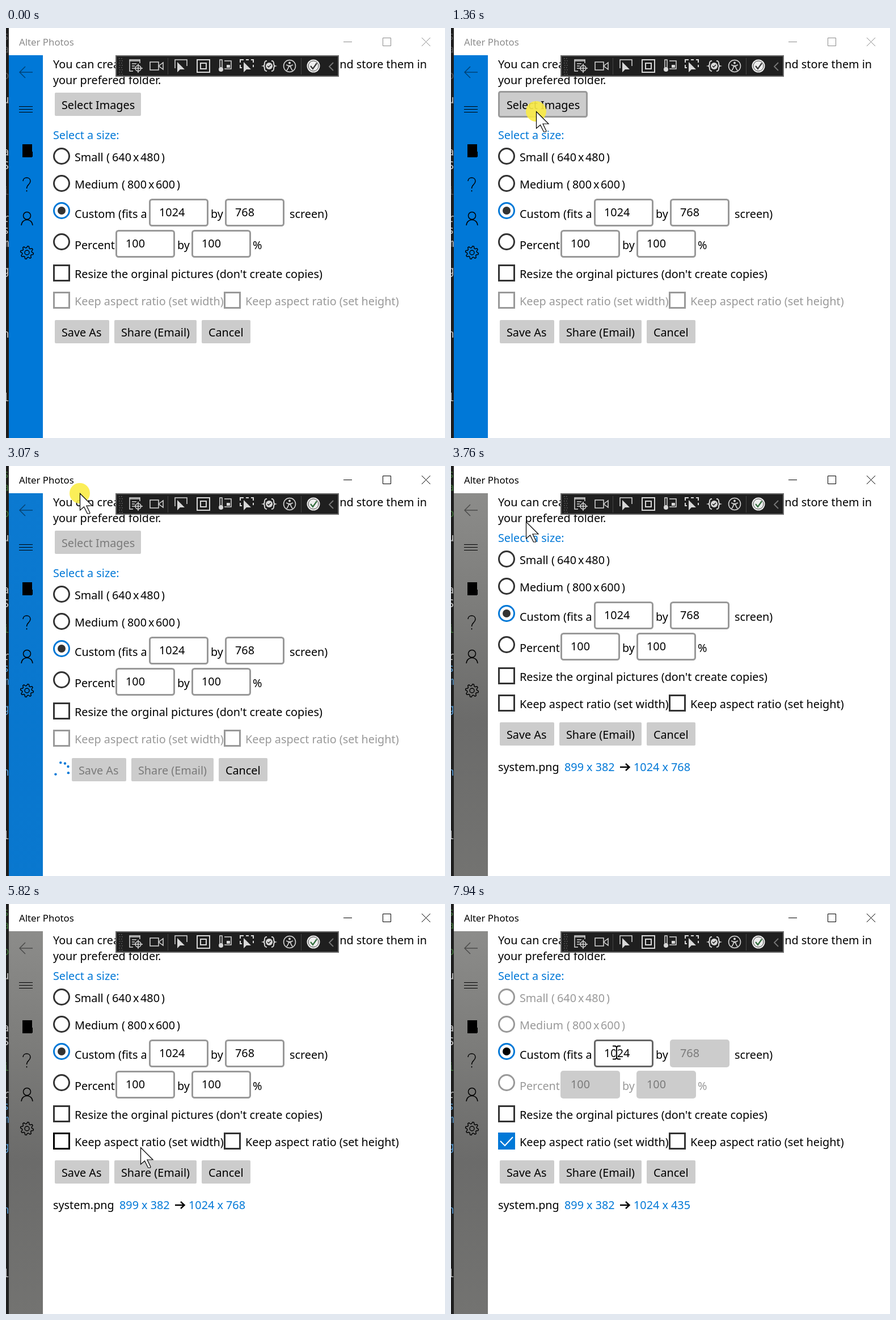
An HTML page with a canvas for the animation above (8000 ms loop, 774 by 723 pixels).

```html
<!DOCTYPE html>
<html lang="en">
<head>
<meta charset="utf-8">
<title>Alter Photos</title>
<style>
  html, body { margin: 0; width: 100%; height: 100%; overflow: hidden; background: #fff; }
  canvas { display: block; }
</style>
</head>
<body>
<canvas id="stage" width="774" height="723"></canvas>
<script>
const c = document.getElementById('stage').getContext('2d');
const LOOP = 8000, BLUE = '#0078d7', GREY = '#999', INK = '#333';
const OPENED = 1440, PICKED = 2790, LOADED = 3480, LISTED = 3620, CHECKED = 7050;
const clicks = [1160, PICKED, 6910];

// Pointer path: time, x, y
const path = [
  [330, 467, 294], [960, 150, 147], [2240, 150, 147], [2380, 130, 48], [3550, 130, 48],
  [4360, 142, 348], [4640, 147, 302], [4910, 236, 320], [5190, 270, 266], [5400, 270, 266],
  [6030, 225, 485], [6100, 225, 485], [6370, 225, 428], [6570, 225, 428], [6780, 169, 424],
  [7320, 169, 424], [7940, 292, 262], [LOOP, 292, 262]
];

const clamp = v => Math.max(0, Math.min(1, v));
const ramp = (t, a, b) => clamp((t - a) / (b - a));
const ease = p => p * p * (3 - 2 * p);

function pointerAt(t) {
  if (t < path[0][0]) return null;
  const i = Math.max(1, path.findIndex(k => k[0] > t));
  const [t0, x0, y0] = path[i - 1], [t1, x1, y1] = path[i];
  const p = ease(ramp(t, t0, t1));
  return { x: x0 + (x1 - x0) * p, y: y0 + (y1 - y0) * p };
}

function rect(x, y, w, h, fill) { c.fillStyle = fill; c.fillRect(x, y, w, h); }

function round(x, y, w, h, r, fill, stroke, width = 3) {
  c.beginPath(); c.roundRect(x, y, w, h, r);
  if (fill) { c.fillStyle = fill; c.fill(); }
  if (stroke) { c.strokeStyle = stroke; c.lineWidth = width; c.stroke(); }
}

function circle(x, y, r, fill, stroke, width = 3) { round(x - r, y - r, 2 * r, 2 * r, r, fill, stroke, width); }

function line(d, color, width = 1.5) {
  c.strokeStyle = color; c.lineWidth = width; c.stroke(new Path2D(d));
}

function text(s, x, y, color = '#000', size = 19.8, align = 'left', family = '"Noto Sans", sans-serif') {
  c.font = `${size}px ${family}`;
  c.fillStyle = color; c.textAlign = align;
  c.fillText(s, x, y);
}

function drawEditorEdge(active) {
  rect(0, 0, 5, 723, '#1e1e1e');
  c.save();
  c.beginPath(); c.rect(0, 0, 5, 723); c.clip();
  const ys = [21, 44, 90, 133, 225, 249, 294, 342, 363, 386, 434, 546, 658];
  [...'saouaSirsmgnl'].forEach((ch, i) => {
    const color = i < 3 || i === 6 ? (active ? '#3f7339' : '#555')
      : active && i > 7 && i < 12 ? '#569cd6' : '#c8c8c8';
    text(ch, 5.5, ys[i], color, 19, 'right', '"Noto Sans Mono", monospace');
  });
  c.restore();
}

function drawTitleBar(active) {
  const color = active ? '#000' : '#8c8c8c';
  text('Alter Photos', 23, 31, color, 16.8);
  line('M595 24.5h15M664.5 17.5h14v14h-14zM733 17l15 15M748 17l-15 15', color, 1);
}

function drawSidebar(t) {
  rect(5, 48, 60, 675, BLUE);
  const g = c.createLinearGradient(0, 48, 0, 723);
  [[0, '#8c8c8a'], [.3, '#7c7c7a'], [.6, '#6b6b6a'], [1, '#737371']].forEach(s => g.addColorStop(...s));
  c.globalAlpha = ramp(t, 3035, LOADED);
  rect(5, 48, 60, 675, g);
  c.globalAlpha = 1;
  line('M24 78h23M34 68l-10 10 10 10', 'rgba(0,0,0,.45)');
  line('M23 138.5h24M23 143.5h24M23 148.5h24', '#000', 1.2);
  rect(29, 205, 17, 23, '#000');
  rect(45, 218, 2, 9, '#000');
  line('M30 270c0-8 13-8 13 0c0 6-6.500 6-6.500 13M36.500 286v2.500', '#000');
  circle(37, 331, 6.5, null, '#000', 1.5);
  line('M27 348c1-13 19-13 20 0', '#000');
  c.beginPath();
  for (let i = 0; i < 32; i++) {
    const a = (i + .5) / 32 * Math.PI * 2, r = i % 4 < 2 ? 11.500 : 8.500;
    c.lineTo(37 + r * Math.cos(a), 396 + r * Math.sin(a));
  }
  c.closePath(); c.strokeStyle = '#000'; c.lineWidth = 1.4; c.stroke();
  circle(37, 396, 4, null, '#000', 1.4);
}

function drawToolbar(active) {
  const light = '#d8d8d8';
  rect(193, 48, 394, 38, '#6a6a6a');
  rect(195, 50, 390, 34, '#1f1f1f');
  for (let y = 53; y < 82; y += 4)
    for (let x = 199; x < 207; x += 4) rect(x + (y % 8 === 5 ? 0 : 1), y, 1.5, 1.5, '#666');
  rect(285, 53, 1, 29, '#444');
  rect(520, 53, 1, 29, '#444');
  // Tree view with target
  line('M236 62v-6h-18v20h6M218 58h18M222 63h8M222 67h5M222 71h3', light);
  circle(233, 71, 5, null, light, 1.5);
  line('M233 63v16M225 71h16', light);
  // Camera
  line('M254 60h15v14h-15zM269 67l8-6v12z', light);
  // Select element
  line('M298 71v-15h21v11', light);
  c.fillStyle = light; c.fill(new Path2D('M302 60v18l5-5h8z'));
  // Adorners
  line('M337 56h22v22h-22z', light, 2);
  line('M343 62h10v10h-10z', light, 2);
  // Thermometer and panel
  line('M377 70v-14h4v14', light);
  circle(379, 73, 4, light);
  line('M385 58h12v14h-12', light);
  rect(389, 65, 6, 5, light);
  // Track focus
  line('M413 61v-5h6M423 56h5M432 56h4v5M436 65v4M413 65v5h3', light, 2);
  c.fill(new Path2D('M419 60v18l5-5h8z'));
  // Braces with tick
  line('M460 58c-7 0-2 8-6 9c4 1-1 9 6 9M468 58c7 0 2 8 6 9c-4 1 1 9-6 9', light, 2);
  circle(464, 67, 6, light);
  line('M461 67l2 2 4-4', '#1f1f1f');
  // Accessibility
  circle(500, 67, 10.5, null, light, 1.5);
  circle(500, 61.5, 2, light);
  line('M494 65l4 1.500h4l4-1.500M498 66v4l-3 5M502 66v4l3 5M499 68h2', light);
  // Status
  circle(542, 67, 11.5, '#eee');
  circle(542, 67, 9, null, '#444', 1);
  line('M537 67l4 5 7-10', active ? '#2f6b3a' : '#333', 2.2);
  line('M577 61l-7 7 7 7', '#777', 1.8);
}

function drawForm(t, pointer) {
  const loading = t >= PICKED && t < LOADED, loaded = t >= LOADED;
  const locked = t >= CHECKED, dy = loaded ? -62 : 0;
  const over = (x, y, w, h) => pointer && pointer.x >= x && pointer.x < x + w
    && pointer.y >= y && pointer.y < y + h;

  function button(label, x, y, w, disabled) {
    const hover = !disabled && over(x, y, w, 41);
    if (hover) round(x - 1.5, y - 1.5, w + 3, 44, 3, '#ccc', GREY);
    else round(x, y, w, 41, 2, '#ccc');
    text(label, x + 12, y + 29, disabled ? '#7a7a7a' : '#000');
  }

  function radio(y, disabled, selected) {
    const hover = !disabled && over(83, y - 22, 483, 47);
    circle(98, y, 13.5, null, disabled ? GREY : selected ? BLUE : hover ? '#000' : INK);
    if (selected) circle(98, y, 7, hover ? '#000' : INK);
    return disabled ? GREY : '#000';
  }

  function field(value, x, y, disabled) {
    const hover = !disabled && over(x, y, 105, 49);
    if (disabled) round(x, y, 105, 49, 5, '#ccc');
    else round(x + 1.5, y + 1.5, 102, 46, 4, '#fff', hover ? '#666' : GREY);
    text(value, x + 18, y + 31, disabled ? '#7a7a7a' : '#000');
    if (hover) pointer.beam = true;
  }

  function check(label, x, y, labelX, disabled, checked) {
    const hover = over(x, y, 300, 30);
    if (checked) {
      rect(x, y, 30, 30, BLUE);
      line(`M${x + 4} ${y + 15}l8 8 14-15`, '#fff', 2);
    } else {
      c.strokeStyle = disabled ? GREY : hover ? '#000' : INK;
      c.lineWidth = 3;
      c.strokeRect(x + 1.5, y + 1.5, 27, 27);
    }
    text(label, labelX, y + 24, disabled ? GREY : '#000');
  }

  function preset(name, w, h, x, y) {
    const color = radio(y, locked);
    text(name, 121, y + 9, color);
    [['(', 0], [w, 10], ['x', 47], [h, 60], [')', 97]]
      .forEach(([s, dx]) => text(s, x + dx, y + 9, color));
  }

  text('You can create', 83, 71);
  text('and store them in', 742, 71, '#000', 19.8, 'right');
  text('your prefered folder.', 83, 99);
  if (!loaded) button('Select Images', 86, 114, 152, loading);

  text('Select a size:', 83, 196 + dy, BLUE);
  preset('Small', '640', '480', 177, 226 + dy);
  preset('Medium', '800', '600', 204, 274 + dy);

  radio(322 + dy, false, true);
  text('Custom (fits a', 121, 335 + dy);
  field('1024', 252, 301 + dy);
  text('by', 361, 335 + dy);
  field('768', 386, 301 + dy, locked);
  text('screen)', 500, 335 + dy);

  const percent = radio(377 + dy, locked);
  text('Percent', 121, 390 + dy, percent);
  field('100', 193, 356 + dy, locked);
  text('by', 302, 390 + dy, percent);
  field('100', 327, 356 + dy, locked);
  text('%', 435, 390 + dy, percent);

  check("Resize the orginal pictures (don't create copies)", 83, 417 + dy, 121);
  check('Keep aspect ratio (set width)', 83, 465 + dy, 121, !loaded, locked);
  check('Keep aspect ratio (set height)', 384, 465 + dy, 422, !loaded);

  const dx = loading ? 30 : 0, by = loaded ? 452 : 515;
  button('Save As', 86 + dx, by, 96, loading);
  button('Share (Email)', 191 + dx, by, 145, loading);
  button('Cancel', 345 + dx, by, 86);

  if (loading) for (const deg of [-98, -63, -28, 23, 144]) {
    const a = (deg + (t - 3070) * .3) * Math.PI / 180;
    circle(98 + 13 * Math.cos(a), 536 + 13 * Math.sin(a), 2.2, BLUE);
  }
  if (t >= LISTED) {
    text('system.png', 83, 538);
    text('899 x 382', 200, 538, BLUE);
    line('M298 531h16M308 525l6.500 6-6.500 6', '#000', 2.4);
    text(locked ? '1024 x 435' : '1024 x 768', 322, 538, BLUE);
  }
}

function drawDialog(t) {
  const alpha = Math.min(ramp(t, OPENED, 1680), 1 - ramp(t, PICKED + 70, 3000));
  if (!alpha) return;
  c.globalAlpha = alpha;
  const shade = c.createLinearGradient(0, 630, 0, 652);
  shade.addColorStop(0, 'rgba(0,0,0,.38)');
  shade.addColorStop(1, 'rgba(0,0,0,0)');
  rect(0, 630, 774, 22, shade);
  rect(0, 0, 774, 505, '#fefefe');
  rect(0, 505, 774, 125, '#efefef');
  rect(0, 630, 774, 1, '#666');
  rect(0, 531, 605, 34, '#fff');
  rect(623, 531, 151, 33, '#fff');
  rect(623, 573, 132, 39, '#fff');
  rect(772, 573, 2, 39, '#fff');
  if (t >= 2310) rect(73, 0, 158, 165, '#e5f3ff');
  c.globalAlpha = 1;
}

function drawPointer({ x, y, beam }) {
  c.save();
  c.translate(Math.round(x), Math.round(y));
  if (beam) {
    const d = 'M-7-11.500h5l2 2 2-2h5M0-9.500v19M-7 11.500h5l2-2 2 2h5';
    line(d, '#fff', 4);
    line(d, '#000', 2);
  } else {
    const arrow = new Path2D('M.5.5v29.500l7-6 6 12h4l.5-1.500-6-12.500h10z');
    c.fillStyle = '#fff'; c.fill(arrow);
    c.strokeStyle = '#000'; c.lineWidth = 1.2; c.stroke(arrow);
  }
  c.restore();
}

function draw(t) {
  const active = t >= PICKED, pointer = pointerAt(t);
  const dialogOpen = t >= OPENED && t < 3000;
  rect(0, 0, 774, 723, '#fff');
  drawEditorEdge(active);
  drawTitleBar(active);
  drawSidebar(t);
  drawForm(t, dialogOpen ? null : pointer);
  drawToolbar(active);
  drawDialog(t);
  if (!pointer) return;
  const sinceClick = Math.min(...clicks.map(k => t >= k ? t - k : LOOP));
  c.globalAlpha = .9 * (1 - ramp(sinceClick, 280, 420));
  circle(pointer.x, pointer.y, 18, '#fbec45');
  c.globalAlpha = 1;
  drawPointer(pointer);
}

const start = performance.now();
function tick() {
  draw((performance.now() - start) % LOOP);
  requestAnimationFrame(tick);
}
tick();
</script>
</body>
</html>
```
